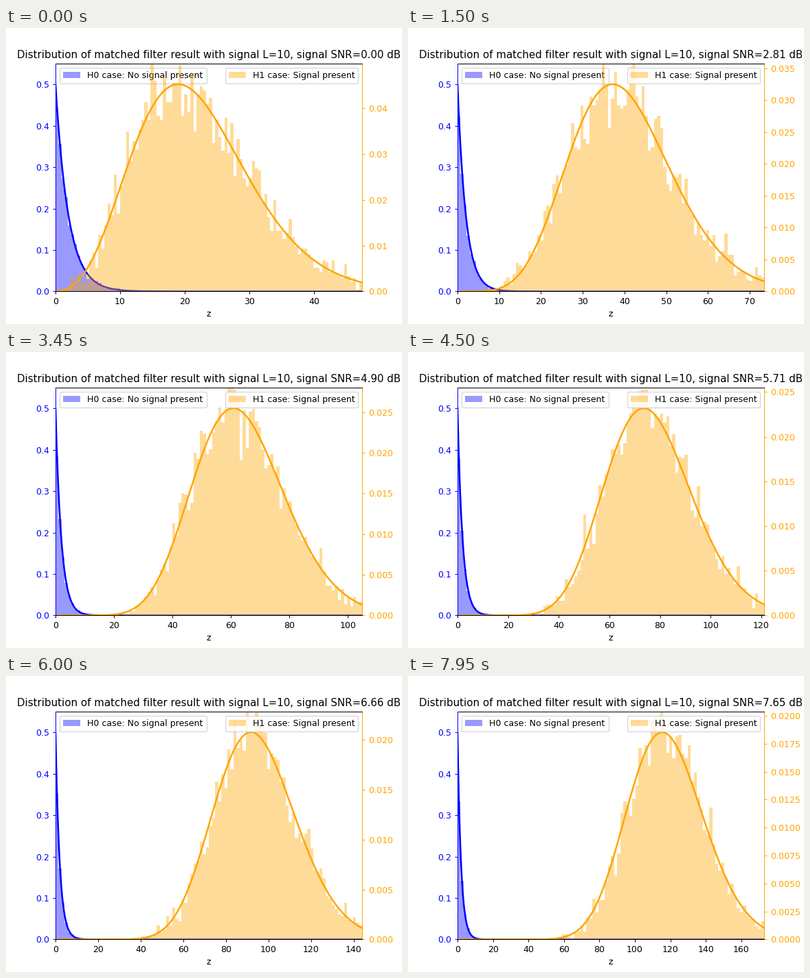
Write a matplotlib script that moves like this. It is 576 by 432 pixels and loops after 8 s.

```python
import numpy as np
import matplotlib.pyplot as plt
from matplotlib.animation import FuncAnimation

L = 10
SAMPLES = 5000
BINS = 100
TICK_MS = 50
TICKS_PER_STEP = 3
LOOP_MS = 8000
SNRS = np.linspace(1, 10, 100)


def h0_pdf(z):
    """Chi-squared density with two degrees of freedom."""
    return 0.5 * np.exp(-z / 2)


def h1_pdf(z, shift):
    """Noncentral chi-squared density with two degrees of freedom."""
    return h0_pdf(z + shift) * np.i0(np.sqrt(shift * z))


def h1_quantile(q, shift):
    z = np.linspace(0, 3 * shift + 40, 4000)
    cdf = np.cumsum(h1_pdf(z, shift)) * (z[1] - z[0])
    return np.interp(q, cdf, z + (z[1] - z[0]) / 2)


def detector_output(rng, shift):
    i, q = rng.standard_normal((2, SAMPLES))
    return (i + np.sqrt(shift)) ** 2 + q ** 2


def style_axis(ax, side, color, loc):
    ax.tick_params(axis="y", colors=color)
    ax.spines["left"].set_color("blue")
    ax.spines["right"].set_color("orange")
    ax.legend(loc=loc)


def make_artists(ax, color, label):
    bars = ax.stairs(np.zeros(BINS), np.linspace(0, 1, BINS + 1), fill=True,
                     color=color, alpha=0.4, linewidth=0, label=label)
    curve, = ax.plot([], [], color=color, lw=2)
    return bars, curve


fig, ax0 = plt.subplots(figsize=(6.4, 4.8), dpi=90)
ax1 = ax0.twinx()
bars0, curve0 = make_artists(ax0, "blue", "H0 case: No signal present")
bars1, curve1 = make_artists(ax1, "orange", "H1 case: Signal present")
style_axis(ax0, "left", "blue", "upper left")
style_axis(ax1, "right", "orange", "upper right")
ax0.set_xlabel("z")
ax0.set_ylim(0, 0.55)
title = ax0.set_title("")


def update(tick):
    step = tick // TICKS_PER_STEP
    snr = SNRS[step]
    shift = 2 * L * snr
    z_max = h1_quantile(0.99, shift)
    z = np.linspace(0, z_max, 500)
    edges = np.linspace(0, z_max, BINS + 1)
    rng = np.random.default_rng(step)

    for bars, curve, offset, density in (
        (bars0, curve0, 0, h0_pdf(z)),
        (bars1, curve1, shift, h1_pdf(z, shift)),
    ):
        heights, _ = np.histogram(detector_output(rng, offset), edges, density=True)
        bars.set_data(heights, edges)
        curve.set_data(z, density)

    ax0.set_xlim(0, z_max)
    ax1.set_ylim(0, 1.1 * h1_pdf(z, shift).max())
    title.set_text(f"Distribution of matched filter result with signal L={L}, "
                   f"signal SNR={10 * np.log10(snr):.2f} dB")
    return bars0, curve0, bars1, curve1, title


anim = FuncAnimation(fig, update, frames=LOOP_MS // TICK_MS, interval=TICK_MS,
                     repeat=True, repeat_delay=0)
plt.show()
```
